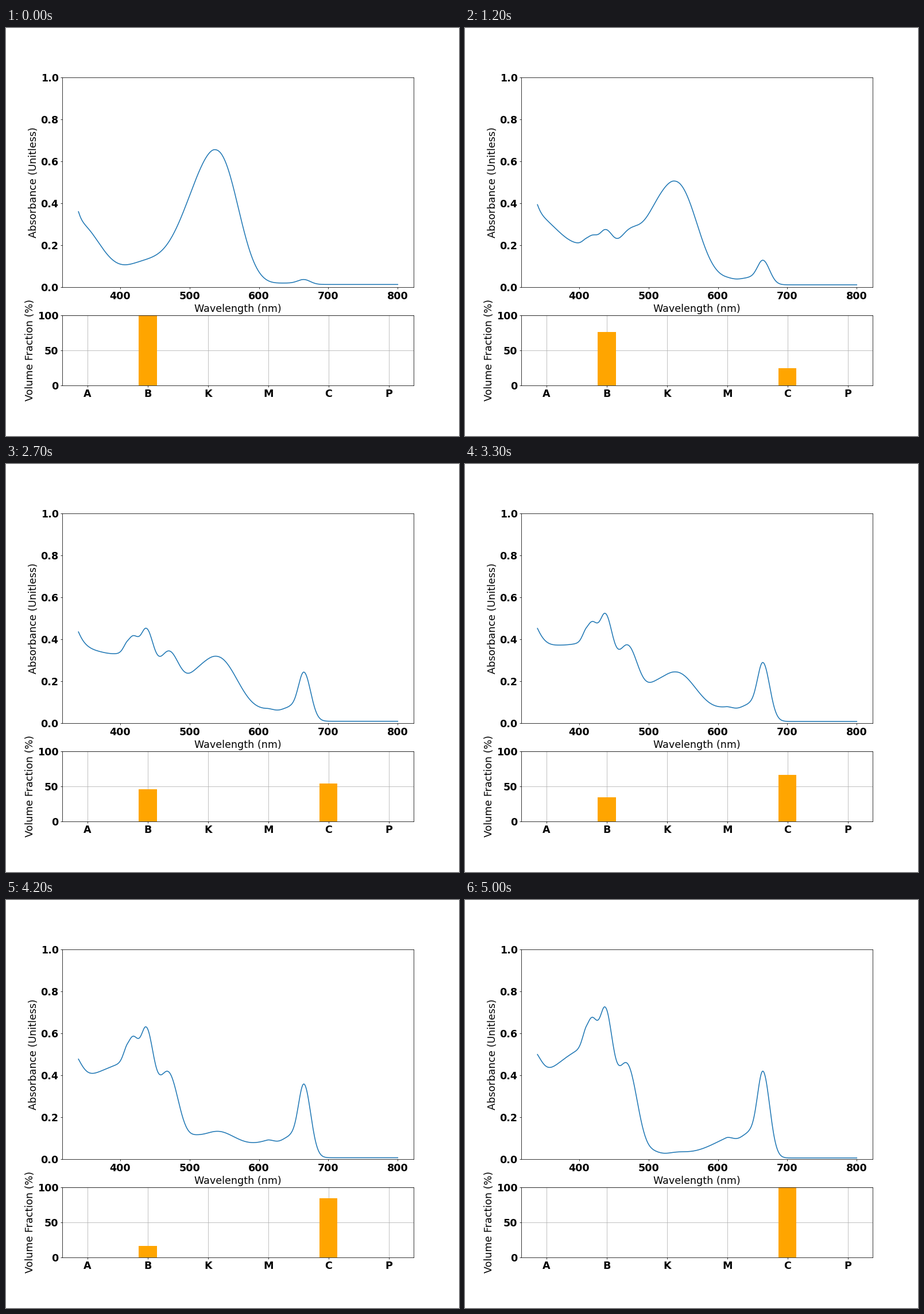
These frames come from a looping animation (789x710 px, 5600 ms). A matplotlib script:

```python
import numpy as np
import matplotlib.pyplot as plt
from matplotlib.animation import FuncAnimation

plt.rcParams.update({
    "font.family": "DejaVu Sans",
    "font.size": 18,
    "font.weight": "bold",
    "axes.labelweight": "normal",
})

WIDTH, HEIGHT, DPI = 789, 710, 70.125
STEP_MS = 100
FRAMES = 56
MIX_STEPS = 50  # the mixture is then held until the loop restarts

wave = np.arange(340, 801)


def band(center, height, left, right=None, pl=2, pr=2):
    """Absorption band with its own width and falloff power on each side."""
    d = wave - center
    width = np.where(d < 0, left, right or left)
    return height * np.exp(-(abs(d) / width) ** np.where(d < 0, pl, pr))


dye_b = 0.013 + sum([
    band(330, 0.13, 10),                            # ultraviolet tail
    band(337, 0.30, 48.8),
    band(430, 0.07, 35.4),
    band(536, 0.642, 58.1, 44, pl=1.8, pr=2.3),     # main band
    band(640, 0.006, 22),
    band(665, 0.022, 13),
])

dye_c = 0.006 + sum([
    band(330, 0.18, 18),                            # ultraviolet tail
    band(411, 0.525, 131, 16.6, pl=1.6, pr=2.9),    # blue bands
    band(411, 0.085, 8, 16.6, pr=2.9),
    band(437, 0.67, 14, 15.8),
    band(469, 0.44, 20, 21),
    band(508, 0.017, 14),
    band(538, 0.015, 22),
    band(613, 0.095, 43, 21, pl=1.3),               # red bands
    band(644, 0.098, 16, 13),
    band(665, 0.406, 12, 13.6),
])

fig, (top, low) = plt.subplots(
    2, 1, figsize=(WIDTH / DPI, HEIGHT / DPI), dpi=DPI, facecolor="white",
    gridspec_kw=dict(height_ratios=[3, 1], left=0.1247, right=0.9,
                     bottom=0.1245, top=0.8794, hspace=0.2))

line, = top.plot(wave, dye_b, color="#1f77b4", lw=1.6)
top.set(xlim=(317, 823), ylim=(0, 1),
        xlabel="Wavelength (nm)", ylabel="Absorbance (Unitless)")

low.set_axisbelow(True)
low.grid(True)
bars = low.bar(list("ABKMCP"), [0, 100, 0, 0, 0, 0], width=0.3, color="orange")
low.set(xlim=(-0.415, 5.415), ylim=(0, 100), yticks=[0, 50, 100],
        ylabel="Volume Fraction (%)")


def update(i):
    part = min(i, MIX_STEPS) / MIX_STEPS
    line.set_ydata((1 - part) * dye_b + part * dye_c)
    bars[1].set_height(100 * (1 - part))
    bars[4].set_height(100 * part)
    return line, bars[1], bars[4]


anim = FuncAnimation(fig, update, frames=FRAMES, interval=STEP_MS,
                     repeat=True, repeat_delay=0, blit=False)
plt.show()
```
